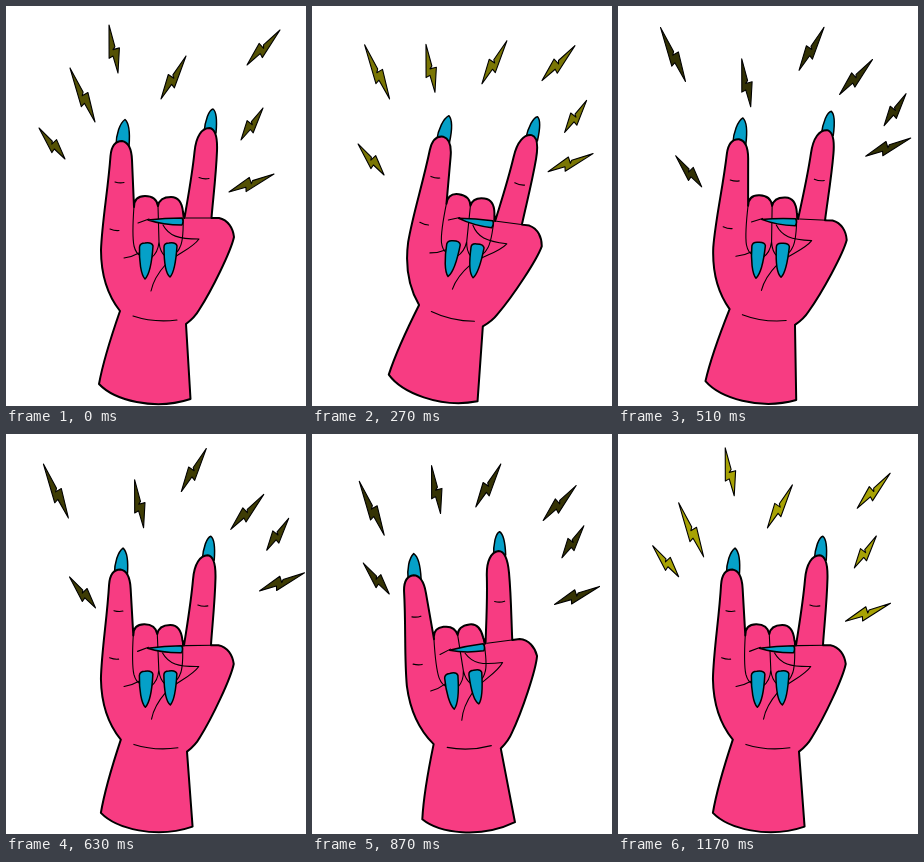
Animation, 300 px wide and 400 px high, one loop 1200 ms. Source, as an HTML page:

```html
<!DOCTYPE html>
<html lang="en">
<head>
<meta charset="utf-8">
<title>Rock hand</title>
<style>
html, body { margin: 0; width: 100%; height: 100%; overflow: hidden; background: #fff; }
svg { display: block; width: 100vw; height: 100vh; }
path { stroke: #000; stroke-linejoin: round; stroke-linecap: round; }
.skin { fill: #f73c82; stroke-width: 2; }
.nail { fill: #05a0c8; stroke-width: 1.5; }
.line { fill: none; stroke-width: 1.1; }
#bolts path { stroke-width: 1.1; }
</style>
</head>
<body>
<svg viewBox="0 0 300 400" xmlns="http://www.w3.org/2000/svg">
  <g id="bolts"></g>
  <g id="hand">
    <path class="nail" d="M110 140C110 128 114 117 119 113.5C123 117 124 128 123 140Z"/>
    <path class="nail" d="M198 127C199 114 203 104 207 103C211 106 211 116 210 127Z"/>
    <path class="skin" d="M114 305C103 291 95 272 95 244C96 216 102 184 104.500 150C105.500 139 110 135 116 135C122 136 125.500 142 126 154L128 201C128 194 132 190 139 190C147 190 151 194 152 200C153 194 158 191 165 191C172 191 176 196 177 206L178.500 212C182 191 186 170 188.500 146C190 130 196 122 203.500 122C210 123 211.500 132 211 145C210 170 207 193 205.500 212L213 212C222 214 227 222 228 231C225 245 206 284 193 304C189 311 184 315 180 318L184.500 393C148 405 108 394 93 378C97 356 106 328 114 305Z"/>
    <path class="line" d="M128 200C127 214 126 230 128 240Q130 248 135 250M152 200L153 236Q152 247 145 252M153 236Q154 246 159 250M177 206Q178 234 174 241Q172 246 169 247"/>
    <path class="line" d="M157 219C163 230 172 233 193 233C186 243 170 248 160 258C152 267 147 275 145 285M180 212H207"/>
    <path class="line" d="M118 252Q126 251 133 247M132 217L143 213M109 176Q114 177.500 118 176.500M104 223Q109 225 113 224.500M193 171.500Q198 173.500 203 172.500M127 310Q148 317 171 314"/>
    <path class="nail" d="M133.500 241Q134 237 139 237Q146 236 147 240C146 255 143 269 139 273C135 269 133 255 133.500 241Z"/>
    <path class="nail" d="M158 241Q158 237 163 237Q170 236 171 240C170 255 168 267 164 271C160 268 158 255 158 241Z"/>
    <path class="nail" d="M142 214Q159 212 176 212Q178 215 176 219Q157 219 142 214Z"/>
  </g>
</svg>
<script>
const LOOP = 1200, STEP = 30;
const EARLY = 490, LATE = 640; // when a bolt turns back on each axis
const SWING = 8.3;             // degrees
const BOLT_WIDTH = 6;

// Straight runs between [time, value] points.
const track = (...points) => t => {
  const i = Math.max(1, points.findIndex(p => p[0] > t));
  const [t0, v0] = points[i - 1], [t1, v1] = points[i];
  return v0 + (v1 - v0) * (t - t0) / (t1 - t0);
};
const drift = (peak, far, end) => track([0, 0], [peak, far], [LOOP, end]);

const tilt = track([0, 0], [LOOP / 4, SWING], [LOOP * 3 / 4, -SWING], [LOOP, 0]);
const glow = track([0, 84], [270, 122], [510, 50], [750, 74], [990, 32], [LOOP, 190]);

// A zigzag along the unit axis; bolts leaning left are mirrored.
const zigzag = [[0, 0], [.46, .3], [.51, -.1], [.5, 1], [1, 0], [.64, -.3], [.67, -1]];
function boltPath([x, y], [dx, dy]) {
  const k = Math.sign(dx) * BOLT_WIDTH / Math.hypot(dx, dy);
  const at = ([s, p]) => [x + dx * s + dy * p * k, y + dy * s - dx * p * k].map(v => v.toFixed(1));
  return `M${zigzag.map(at).join("L")}Z`;
}

// tip: sharp top, axis: tip to tail, far: turning point, end: offset when the loop closes
const bolts = [
  { tip: [33, 122], axis: [26, 31], far: [31, 29], end: [0, -12] },
  { tip: [64, 62], axis: [25, 54], far: [-27, -42], end: [-2, 9] },
  { tip: [103, 19], axis: [9, 48], far: [26, 35], end: [3, -7] },
  { tip: [180, 50], axis: [-25, 43], far: [27, -36], end: [-7, 3], xFirst: true },
  { tip: [274, 24], axis: [-33, 35], far: [-20, 37], end: [-1, 14], xFirst: true },
  { tip: [257, 102], axis: [-22, 32], far: [32, -18], end: [0, 1], xFirst: true },
  { tip: [268, 168], axis: [-45, 18], far: [31, -37], end: [3, 3] }
].map(({ tip, axis, far, end, xFirst }) => {
  const el = document.createElementNS("http://www.w3.org/2000/svg", "path");
  el.setAttribute("d", boltPath(tip, axis));
  document.getElementById("bolts").append(el);
  return {
    el,
    x: drift(xFirst ? EARLY : LATE, far[0], end[0]),
    y: drift(xFirst ? LATE : EARLY, far[1], end[1])
  };
});
const hand = document.getElementById("hand");

function draw(now) {
  const t = Math.floor((now % LOOP) / STEP) * STEP;
  hand.setAttribute("transform", `rotate(${tilt(t).toFixed(3)} 157 249)`);
  const v = Math.round(glow(t));
  for (const { el, x, y } of bolts) {
    el.setAttribute("transform", `translate(${x(t).toFixed(2)} ${y(t).toFixed(2)})`);
    el.setAttribute("fill", `rgb(${v},${Math.round(v * 0.97)},4)`);
  }
}

function tick(now) {
  draw(now);
  requestAnimationFrame(tick);
}
draw(0);
requestAnimationFrame(tick);
</script>
</body>
</html>
```
